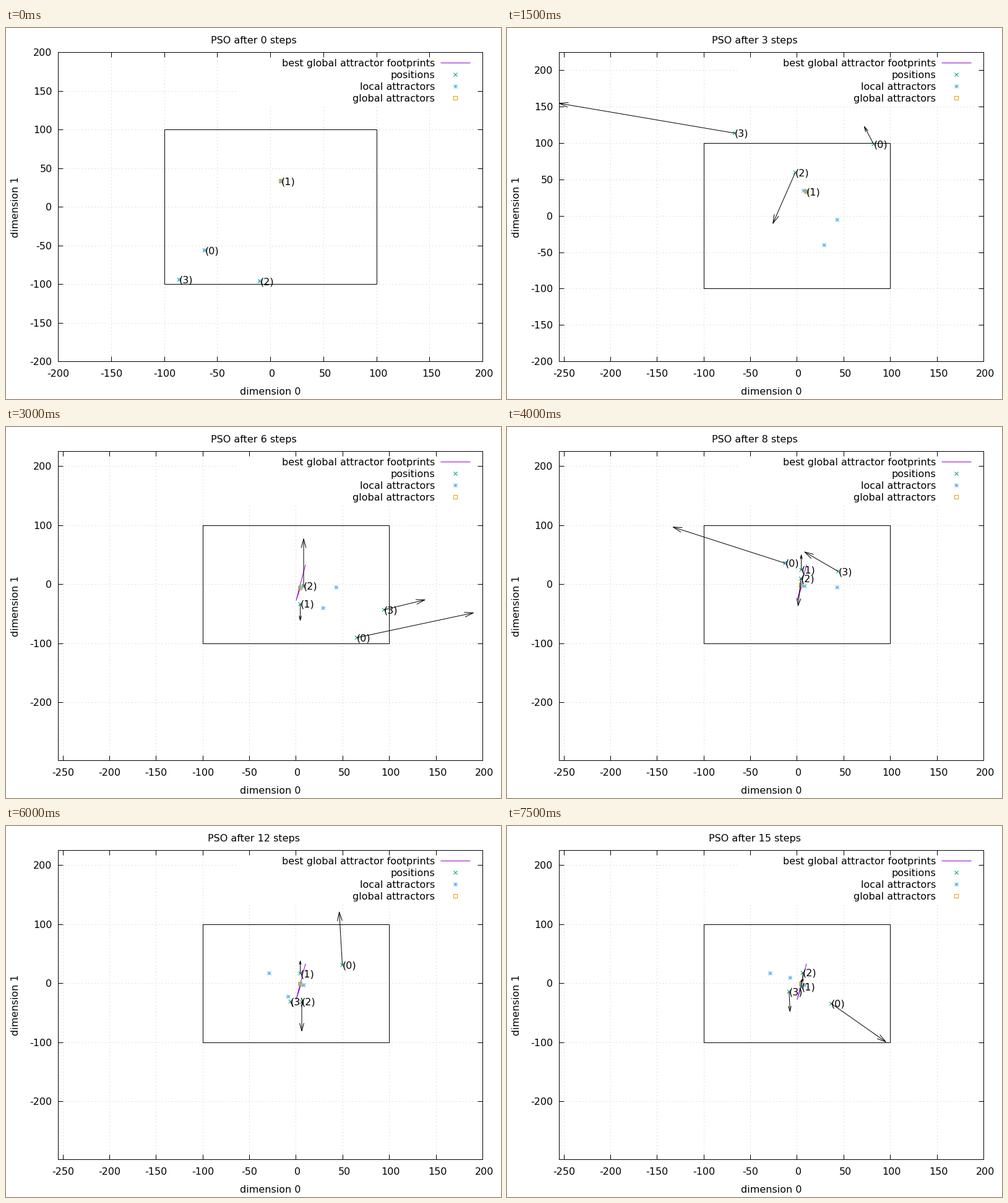
A matplotlib script for the animation above (8000 ms loop, 800 by 600 pixels).

```python
import math
import matplotlib.pyplot as plt
from matplotlib.animation import FuncAnimation
from matplotlib.patches import Rectangle

plt.rcParams.update({"font.family": "DejaVu Sans", "path.snap": False,
                     "lines.solid_capstyle": "butt", "lines.dash_capstyle": "butt"})
PX = 0.72  # points per pixel at 100 dpi
L, R, T, B = 84.5, 770.5, 39.5, 539.5
PURPLE, GREEN, BLUE, ORANGE = "#9400d3", "#009e73", "#56b4e9", "#e69f00"
STEPS = 16

# wide first flight of each particle, one key point per step
LAUNCH = [
    [(-62, -56), (29, -40), (92, 75), (82, 99), (-5, -99.5),
     (-60, -132), (65, -90), (107, -25), (-13, 36)],
    [(10, 33.5)] * 5,
    [(-10, -96), (7, 35), (22, 130), (-2, 60), (0, -27),
     (8, -83), (8, -3), (7, 56), (4, 10)],
    [(-86, -94), (43, -5), (121, 73), (-67, 114), (-78, 24),
     (50, -60), (94, -43), (80, -11), (44, 22)],
]
# fading swing that follows: centre x, y, reach x, y and step of the upper peak
SWING = [(12, 28, 52, 80, 13), (4.4, -2, 0, 19, 12.1),
         (6, 4, 0, 38, 14.3), (-8, -4, 2, 31, 13.7)]
PERIOD, FADE = 4.1, 0.92


def position(i, t):
    if t < len(LAUNCH[i]):
        return LAUNCH[i][t]
    cx, cy, rx, ry, peak = SWING[i]
    wave = 2 * math.pi / PERIOD
    fade = FADE ** (t - 12)
    return (cx + rx * fade * math.cos(wave * (t - peak + 1.5)),
            cy + ry * fade * math.cos(wave * (t - peak)))


def cost(p):
    """Bowl that the swarm tries to descend."""
    return 1.33 * (p[0] - 4) ** 2 + (p[1] + 1.5) ** 2


PATHS = [[position(i, t) for t in range(STEPS)] for i in range(len(LAUNCH))]


def tip(path, t):
    """Where the current velocity would carry a particle next."""
    (x0, y0), (x, y) = path[max(t - 1, 0)], path[t]
    return 2 * x - x0, 2 * y - y0


def view(t):
    """Limits only ever grow, to hold the arrow tips."""
    xs, ys = zip(*(tip(p, s) for p in PATHS for s in range(t + 1)))
    return min(-200, *xs), max(200, *xs), min(-200, *ys), max(200, *ys)


def global_trail(t):
    trail = []
    for s in range(t + 1):
        best = min((path[s] for path in PATHS), key=cost)
        if not trail or cost(best) < cost(trail[-1]):
            trail.append(best)
    return trail


fig = plt.figure(figsize=(8, 6), dpi=100, facecolor="white")
ax = fig.add_axes([0, 0, 1, 1])


def line(xs, ys, color="black", **kw):
    ax.plot(xs, ys, color=color, lw=PX, **kw)


def text(x, y, s, ha="center"):
    ax.text(x, y + 5.5, s, ha=ha, va="baseline", fontsize=16 * PX)


STROKES = {
    "x": [((-3, 3), (-3, 3)), ((-3, 3), (3, -3))],
    "+": [((-3, 3), (0, 0)), ((0, 0), (-3, 3))],
    "s": [((-3, 3, 3, -3, -3, 3), (-3, -3, 3, 3, -3, -3))],
}


def mark(x, y, shapes, color):
    for shape in shapes:
        for dx, dy in STROKES[shape]:
            line([x + d for d in dx], [y + d for d in dy], color)


def arrow(x0, y0, x1, y1):
    size = math.hypot(x1 - x0, y1 - y0)
    if size < 0.5:
        return
    head, ang = min(15, 0.28 * size), math.atan2(y1 - y0, x1 - x0)
    line([x0, x1], [y0, y1], zorder=4)
    (ax0, ay0), (ax1, ay1) = [
        (x1 - head * math.cos(ang + s), y1 - head * math.sin(ang + s))
        for s in (-math.pi / 12, math.pi / 12)]
    line([ax0, x1, ax1], [ay0, y1, ay1], zorder=4)


def crisp(p):
    return [math.floor(v + 1e-6) + 0.5 for v in p]


def ticks(lo, hi):
    step = 50 if hi - lo < 500 else 100
    return range(math.ceil(lo / step) * step, 201, step)


def frame_axes(limits, to_px):
    xmin, xmax, ymin, ymax = limits
    dots = dict(color="#d2d2d2", dashes=(1.4, 4), zorder=1)
    for v in ticks(xmin, xmax):
        x = crisp(to_px(v, 0))[0]
        if xmin < v < xmax:
            line([x, x], [B, T], **dots)
        line([x, x], [T, T + 8])
        line([x, x], [B, B - 8])
        text(x + (2.5 if v >= 0 else 0), 558.5, str(v))
    for v in ticks(ymin, ymax):
        y = crisp(to_px(0, v))[1]
        if ymin < v < ymax:
            line([L, R], [y, y], **dots)
        line([L, L + 8], [y, y])
        line([R, R - 8], [y, y])
        text(74.5, y, str(v), "right")
    ax.add_patch(Rectangle((372, 47.5), 390, 77, fc="white", ec="none", zorder=1.5))
    box(L, T, R, B)
    text(427.5, 587.5, "dimension 0")
    ax.text(20, 289.5, "dimension 1", rotation=90, rotation_mode="anchor",
            ha="center", va="baseline", fontsize=16 * PX)


def box(x0, y0, x1, y1):
    line([x0, x1, x1, x0, x0], [y0, y0, y1, y1, y0], solid_capstyle="projecting")


def legend():
    names = ("best global attractor footprints", "positions",
             "local attractors", "global attractors")
    for i, name in enumerate(names):
        text(693.5, 56.5 + 19 * i, name, "right")
    line([702.5, 750.5], [56.5, 56.5], PURPLE)
    mark(726.5, 75.5, "x", GREEN)
    mark(726.5, 94.5, "x+", BLUE)
    mark(726.5, 113.5, "s", ORANGE)


def draw(t):
    ax.clear()
    ax.set(xlim=(0, 800), ylim=(600, 0))
    ax.axis("off")
    limits = xmin, xmax, ymin, ymax = view(t)

    def to_px(x, y):
        return (L + (x - xmin) / (xmax - xmin) * (R - L),
                B - (y - ymin) / (ymax - ymin) * (B - T))

    frame_axes(limits, to_px)
    text(400.5, 19.5, f"PSO after {t} steps")
    box(*crisp(to_px(-100, 100)), *crisp(to_px(100, -100)))

    trail = [to_px(*p) for p in global_trail(t)]
    line(*zip(*trail), color=PURPLE)
    for path in PATHS:
        mark(*to_px(*path[t]), "x", GREEN)
    for path in PATHS:
        mark(*to_px(*min(path[:t + 1], key=cost)), "x+", BLUE)
    mark(*trail[-1], "s", ORANGE)

    for i, path in enumerate(PATHS):
        x, y = to_px(*path[t])
        text(x, y, f"({i})", "left")
        arrow(x, y, *to_px(*tip(path, t)))
    legend()
    return []


anim = FuncAnimation(fig, draw, frames=STEPS, interval=500, init_func=lambda: [],
                     repeat=True, repeat_delay=0, blit=False)
plt.show()
```
